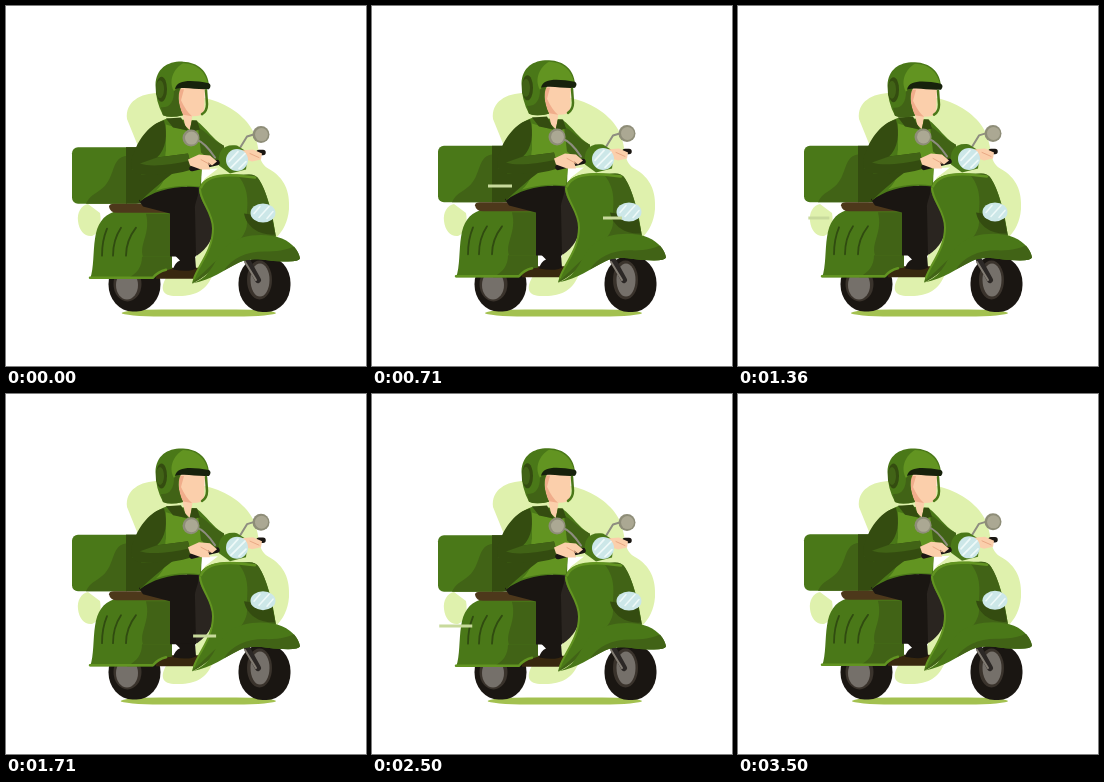
Recreate the animation shown at these times as an HTML page. Size 360 by 360 pixels, loop 3.57 s.

```html
<!DOCTYPE html>
<html lang="en">
<head>
<meta charset="utf-8">
<title>Scooter delivery</title>
<style>
html, body { margin: 0; width: 100%; height: 100%; overflow: hidden; background: #fff; }
svg { display: block; width: 100%; height: 100%; }
.g { fill: #4a7818; }
.d { fill: #416316; }
.dd { fill: #344c10; }
.l { fill: #629421; }
.k { fill: #1a1612; }
.skin { fill: #fbcfab; }
.line { fill: none; stroke-linecap: round; stroke-linejoin: round; }
</style>
</head>
<body>
<svg viewBox="0 0 360 360">
  <g fill="#dff1ad">
    <path d="M121 113C119 96 134 87 153 87C176 86 198 91 212 96C230 103 246 117 250 133C254 146 252 157 263 163C279 172 284 186 283 203C282 216 277 225 270 232L210 258L190 262V235L140 160Z"/>
    <path d="M82 198C75 199 71 207 72 215C73 225 79 231 86 230C93 228 96 217 94 207Z"/>
    <path d="M161 270C153 283 156 291 173 290C190 290 201 284 207 268L192 250Z"/>
  </g>
  <rect id="shadow" y="303.500" height="7" rx="40" ry="3.500" fill="#a3c150"/>

  <g id="wheels">
    <rect class="k" x="102.500" y="251" width="52" height="54.500" rx="24" ry="27"/>
    <ellipse cx="121.500" cy="278" rx="14" ry="17.500" fill="#3a332c"/>
    <ellipse cx="121" cy="279" rx="11" ry="14.500" fill="#75706a"/>
    <rect class="k" x="232.500" y="250" width="52" height="56" rx="24" ry="27"/>
    <ellipse cx="253.500" cy="274" rx="12.500" ry="19.500" fill="#3a332c"/>
    <ellipse cx="254" cy="274" rx="9.500" ry="16.500" fill="#75706a"/>
    <path class="line" d="M241 254L252 274" stroke="#2c2826" stroke-width="6"/>
    <path class="line" d="M239 256L250 274" stroke="#827c73" stroke-width="2"/>
  </g>

  <g id="bike">
    <rect class="g" x="66" y="140.500" width="70" height="56.500" rx="6"/>
    <path class="d" d="M121 149C106 150 109 168 99 179C93 186 84 187 80 197H121Z"/>
    <path class="dd" d="M120 140.500H136V197H120Z"/>
    <path d="M150 261H192V272H150Z" fill="#38280f"/>
    <path class="g" d="M108 205H166V262C155 264 150 266 147 272H84C88 262 87 244 89 232C91 217 97 209 108 205Z"/>
    <path class="d" d="M140 207H166V250H137C133 237 145 227 140 207Z"/>
    <path class="d" d="M136 250H166V262C155 264 150 266 147 272H121C131 267 136 260 136 250Z"/>
    <path class="line" d="M84 271H147C151 266 155 264 160 263" stroke="#629421" stroke-width="2.500"/>
    <path class="line" d="M101 222Q96 234 96 249M115 221Q107 233 107 249M130 221Q120 234 120 249" stroke="#304b10" stroke-width="1.800"/>
    <path d="M103 200Q103 197 108 197H166V206H111Q104 206 103 200Z" fill="#4d381b"/>
  </g>

  <g id="rider">
    <path fill="#fff" d="M190 163L212 162L199 172L192 182Z"/>
    <path fill="#2a2520" d="M181 179H193L208 220Q207 238 191 249H180Z"/>
    <path class="k" d="M133 194C143 182 168 178 192 181C194 190 188 195 189 204L190 250H164V207L137 200Z"/>
    <path class="k" d="M169 249H189L190 262Q184 266 167 263Q169 256 174 254Z"/>
    <path class="g" d="M161 112L190 114C201 122 207 133 216 138L222 158H207L196 151L195 181C172 178 147 184 134 195L135 166L126 163C126 146 137 120 161 112Z"/>
    <path class="l" d="M160 118L183 125L191 122C201 130 198 142 197 151L194 180C179 178 163 180 150 184C166 170 157 156 160 144Z"/>
    <path class="d" d="M192 121C201 125 207 135 218 139V158H210L195 146Z"/>
    <path class="dd" d="M158 114C144 117 133 132 128 146C123 156 124 167 134 168C151 170 170 168 186 163L182 147L151 151C160 143 162 128 158 114Z"/>
    <path class="d" d="M151 151L182 147L184 154C166 158 145 161 134 157Z"/>
    <path class="dd" d="M134 168C149 169 158 167 168 166C157 174 148 182 134 195Z"/>
    <path class="skin" d="M176 105H187L184 124L179 119Z"/>
    <path class="dd" d="M160 112L175 111L182 124L167 121ZM186 114L191 114L194 123L183 126Z"/>
  </g>

  <g id="front">
    <path class="g" d="M193 182C196 170 214 167 229 168L243 168Q250 168 253 173C261 186 267 207 270 232L225 252L186 277C190 261 207 245 207 222C207 206 193 196 193 182Z"/>
    <path class="d" d="M232 169C246 186 240 202 241 215C242 229 227 242 208 256L186 277C209 267 217 245 237 234L270 230C265 203 260 183 253 173Q250 168 243 168Z"/>
    <path class="line" d="M195 181C199 171 214 168 231 169L249 171" stroke="#629421" stroke-width="2.500"/>
    <path class="line" d="M194 183C195 196 207 206 207 222C207 244 192 259 188 272" stroke="#629421" stroke-width="2"/>
    <path class="g" d="M186 277C208 270 208 250 222 238C236 227 261 226 276 232C288 237 293 246 294 252Q293 255 282 255C260 255 247 249 233 256C218 263 207 273 186 277Z"/>
    <path class="d" d="M218 264C226 251 242 244 262 245C275 245 283 242 288 240Q293 246 294 252Q293 255 282 255C260 255 247 249 233 256Z"/>
    <path class="dd" d="M238 207C241 222 255 229 269 228L266 211Z"/>
    <ellipse cx="257" cy="206.500" rx="12.500" ry="9.500" fill="#cce7e8"/>
    <path class="line" d="M248 207L254 200M253 211L263 200M261 212L267 205" stroke="#eef9f8" stroke-width="1.500"/>
    <path class="line" d="M190 133Q199 136 209 151M233 143L241 130L251 127" stroke="#8e8d80" stroke-width="2"/>
    <g fill="#8e8d78"><circle cx="185" cy="131.500" r="8.500"/><circle cx="255" cy="128" r="8.500"/></g>
    <g fill="#aba893"><circle cx="185.500" cy="131.500" r="6.500"/><circle cx="255.500" cy="128" r="6.500"/></g>
    <path class="g" d="M213 159C211 145 217 137 231 139L242 146L240 163L224 167Z"/>
    <path class="line" d="M186 162L211 156M253 146L257 146" stroke="#1a1612" stroke-width="5.500"/>
    <path class="skin" d="M182 153L193 148L204 149L211 155L206 159L202 156L204 163L195 163L184 159Z"/>
    <path class="skin" d="M235 144L247 143L256 147L255 153L246 155L237 152Z"/>
    <path class="line" d="M195 153L204 158M244 147L253 151" stroke="#e9a985" stroke-width="1"/>
    <circle cx="231" cy="153.500" r="11" fill="#cce7e8"/>
    <path class="line" d="M223 155L232 145M225 161L239 147M233 162L240 155" stroke="#eef9f8" stroke-width="1.700"/>
  </g>

  <g id="head">
    <path class="skin" d="M172 80H199L198 105Q196 109 187 109L174 107Z"/>
    <path fill="#f0ad8b" d="M172 82H178L175 93Q180 104 186 109L174 107Z"/>
    <path class="g" d="M149.500 78C150 61 162 54 177 54.500C192 55 202 64 203 78H177C171 84 171 96 177 108Q164 111 157 108Q149.500 94 149.500 78Z"/>
    <path class="l" d="M177 56C191 56 200 65 202 77L174 77L168 84C162 73 168 61 177 56Z"/>
    <path class="d" d="M155 100C164 101 168 94 168 84L175 78C171 86 172 97 177 108Q164 111 157 108Z"/>
    <ellipse class="dd" cx="155.500" cy="82" rx="5.500" ry="12.500"/>
    <ellipse class="d" cx="154" cy="82" rx="4" ry="9"/>
    <path d="M169 82C171 72 186 73 203 76Q206 78 203 82C190 83 180 79 169 82Z" fill="#17220c"/>
    <path class="line" d="M200 83L201 97Q201 104 196 107" stroke="#4a7818" stroke-width="2.500"/>
  </g>
  <g id="wind" class="line" stroke="#c8da9c" stroke-width="3" style="stroke-linecap:butt"></g>
</svg>
<script>
const LOOP = 3570, STEPS = 50, SPEED = 0.25;
const $ = id => document.getElementById(id);

// Gusts: y, right limit, left limit, start time, length
const gusts = [
  [63, 190, 95, 82, 24],
  [292, 150, 37, 50, 23],
  [180, 230, 110, 258, 24],
  [212, 250, 37, 638, 21],
  [242, 260, 53, 1422, 23],
  [232, 180, 53, 2048, 33]
].map(([y, right, left, start, length]) => {
  const path = document.createElementNS("http://www.w3.org/2000/svg", "path");
  $("wind").append(path);
  return t => {
    const head = right - (t - start) * SPEED;
    const a = Math.max(left, head), b = Math.min(right, head + length);
    path.setAttribute("d", b > a ? `M${a} ${y}H${b}` : "");
  };
});

function shift(id, y) {
  $(id).setAttribute("transform", `translate(0 ${y.toFixed(2)})`);
}

function draw(now) {
  const step = Math.floor((now % LOOP) / LOOP * STEPS + 0.1) % STEPS;
  // Engine shake: a number of cycles per loop, peaking at a phase
  const shake = (cycles, peak) => Math.cos(2 * Math.PI * (step / STEPS * cycles - peak));
  const body = shake(17, 0.95);
  shift("bike", 0.7 * body);
  shift("front", 0.6 * body);
  shift("rider", 0.6 * body);
  shift("head", 0.6 + 1.1 * shake(24, 0.17));
  const left = 114.3 + 1.4 * body;
  $("shadow").setAttribute("x", left);
  $("shadow").setAttribute("width", 270 - left);
  gusts.forEach(update => update(step * LOOP / STEPS));
}

const begin = performance.now();
function tick() {
  draw(performance.now() - begin);
  requestAnimationFrame(tick);
}
tick();
</script>
</body>
</html>
```
